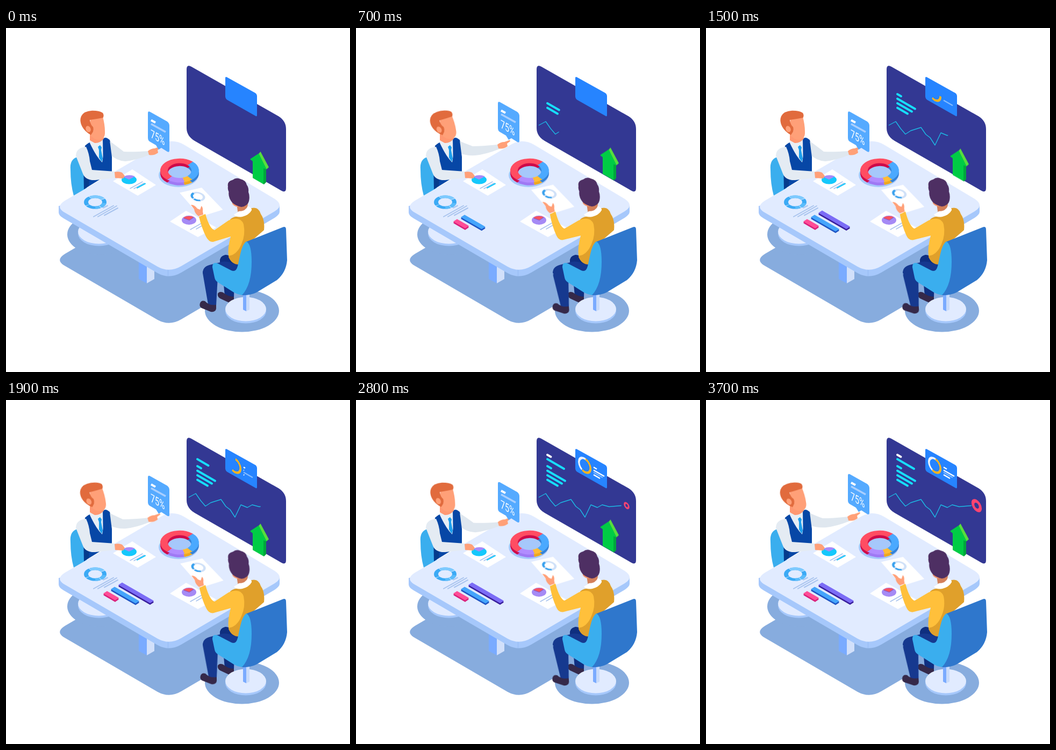
Animation of 640x640 px, one loop 3800 ms. Source, as an HTML page:

```html
<!DOCTYPE html>
<html lang="en">
<head>
<meta charset="utf-8">
<title>Business meeting</title>
<style>
html, body { margin: 0; width: 100%; height: 100%; overflow: hidden; background: #fff; }
svg { display: block; width: 100vw; height: 100vh; }
.line { fill: none; stroke-linecap: round; }

/* --t is the loop time in ms, --s an item's start, --d its duration */
.move, .grow, .pop {
  animation: var(--k) calc(var(--d) * 1ms) calc((var(--s, 0) - var(--t, 0)) * 1ms) paused both;
}
.grow { --k: grow; fill: none; stroke-dasharray: 1 2; animation-timing-function: ease-in-out; }
.bar { stroke-linecap: butt; stroke-width: 7; }
.pop { --k: pop; animation-timing-function: ease-out; }
.lift { --d: 1550; animation-iteration-count: infinite; animation-timing-function: ease; }
.sway {
  --d: 1075; animation-iteration-count: infinite; animation-direction: alternate;
  animation-timing-function: ease;
}
.card { --k: card; }
.nod { --k: nod; transform-origin: 165px 188px; }
.point { --k: point; }
.reach { --k: reach; }
.arrow { --k: arrow; --d: 1900; animation-iteration-count: infinite; animation-timing-function: ease-in-out; }
.look { --k: look; }
.hold { --k: hold; }
.arm { --k: arm; }
.leg { --k: leg; transform-origin: 378px 452px; animation-timing-function: cubic-bezier(.37, 0, .4, 1); }

@keyframes grow { from { stroke-dashoffset: 1.02; } to { stroke-dashoffset: 0; } }
@keyframes pop { from { transform: scale(0); } to { transform: scale(1); } }
@keyframes card {
  0%, 96%, 100% { transform: none; }
  45%, 62% { transform: translateY(-18px); }
}
@keyframes nod {
  0%, 96%, 100% { transform: rotate(0deg); }
  45%, 62% { transform: translate(1.5px, -.5px) rotate(-8deg); }
}
@keyframes point {
  0%, 96%, 100% { transform: none; }
  45%, 62% { transform: translate(-1px, -12px); }
}
@keyframes reach {
  0%, 96%, 100% { d: path("M190 209 Q196 212 219 230 Q236 231 265 229 L267 236 Q242 246 222 248 Q205 247 194 235 Z"); }
  45%, 62% { d: path("M190 209 Q196 212 217 220 Q234 220 263 217 L267 225 Q242 235 222 237 Q205 238 194 233 Z"); }
}
@keyframes arrow {
  0%, 92%, 100% { transform: none; }
  35%, 72% { transform: translateY(-7.5px); }
}
@keyframes look { to { transform: translate(1px, -1px); } }
@keyframes hold { to { transform: translate(3px, -6px); } }
@keyframes arm {
  from { d: path("M359 351 L371 346 Q379 374 388 376 L414 358 Q436 349 442 365 Q446 385 438 402 Q430 422 414 424 Q412 410 418 388 L385 398 Q377 398 372 388 Q364 372 359 351 Z"); }
  to { d: path("M361 346 L371 341 Q379 370 388 373 L414 358 Q436 349 442 365 Q446 385 438 402 Q430 422 414 424 Q412 410 418 386 L385 394 Q377 395 373 386 Q365 369 361 346 Z"); }
}
@keyframes leg { to { transform: translate(.5px, 4.5px) rotate(-5deg); } }
</style>
</head>
<body>
<svg viewBox="0 0 640 640">
<defs>
  <path id="slab" d="M107 342 Q92 332 110 321 L290 216 Q310 205 331 217 L500 318 Q518 330 500 341 L326 443 Q304 456 282 444 Z"/>
</defs>

<!-- wall screen -->
<path fill="#333893" d="M336 77 Q336 67 345 72 L505 163 Q521 172 521 188 V298 Q521 307 513 303 L351 210 Q336 201 336 186 Z"/>
<g class="line" stroke="#17dffb" stroke-width="4">
  <path class="grow" pathLength="1" style="--s:200;--d:450" d="M356 148.500 l19 11"/>
  <path class="grow" pathLength="1" style="--s:350;--d:500" d="M356 140 l27 15.500"/>
  <path class="grow" pathLength="1" style="--s:750;--d:450" d="M356 131.500 l33 19"/>
  <path class="grow" pathLength="1" style="--s:1050;--d:350" d="M356 123 l7 4"/>
  <path class="grow" pathLength="1" style="--s:1600;--d:500" d="M356 110 l31 18"/>
  <path class="grow" pathLength="1" style="--s:2200;--d:500" stroke="#fff" d="M356 102 l6.500 3.700"/>
</g>
<path class="grow" pathLength="1" style="--s:180;--d:2750;animation-timing-function:ease" stroke="#1cb9e4" stroke-width="1.400" stroke-linejoin="round"
  d="M340 181 L353 174 L362 187 L371 197.500 L381 191 L400 185 L409 198 L417 204 L426 218 L437 195 L449 200 L458 195 L471 198.500 L494 196.500"/>
<g transform="matrix(.866 .5 0 1 503.500 196.500)">
  <circle class="pop" style="--s:2550;--d:650" r="8" fill="#333893" stroke="#ff4470" stroke-width="6"/>
</g>

<path fill="#2684ff" d="M408 93 Q408 90 411 91.500 L464 121 Q467 123 467 126 V162 Q467 165.500 464 163.500 L412 134 Q408 131.500 408 127 Z"/>
<g transform="matrix(.866 .5 0 1 425.500 121.500)" stroke-width="4">
  <path class="grow" pathLength="1" style="--s:1050;--d:800" stroke="#ffb41f" d="M-5.240 11.240 A12.400 12.400 0 1 0 1.730 -12.280"/>
  <path class="grow" pathLength="1" style="--s:2050;--d:850" stroke="#eaf2ff" d="M1.730 -12.280 A12.400 12.400 0 0 0 -5.240 11.240"/>
</g>
<g stroke="#fff" stroke-width="2.200">
  <path class="grow" pathLength="1" style="--s:1650;--d:500" d="M442 125 l6 3.500"/>
  <path class="grow" pathLength="1" style="--s:1750;--d:900" d="M442 130.500 l20 11.500"/>
  <path class="grow" pathLength="1" style="--s:650;--d:800" stroke="#83bbff" d="M442 134.500 l17 9.800"/>
  <path class="grow" pathLength="1" style="--s:1700;--d:800" d="M442 139 l12 7"/>
</g>

<g class="move arrow">
  <path fill="#00a73c" d="M477 260 L484 262 V287 L480 291 L477 289 Z"/>
  <path fill="#57de3c" d="M470 234 L473.500 230 L489 259 L484.500 263 Z"/>
  <path fill="#00cc45" d="M454 244 L470 233.500 L485 263 L479 261 V290.500 L459 279 V248 Z"/>
</g>

<!-- floor -->
<g fill="#87acde">
  <use href="#slab" y="99"/>
  <ellipse cx="176" cy="384" rx="62" ry="38"/>
  <ellipse cx="439" cy="526" rx="69" ry="39.500"/>
</g>
<ellipse cx="173" cy="383" rx="39" ry="22.500" fill="#a6c8fb"/>
<ellipse cx="173" cy="379" rx="39" ry="22.500" fill="#e1ebff"/>
<path fill="#7aabff" d="M247 420 H262 V475 L247 467 Z"/>
<path fill="#d2e0fa" d="M262 420 H276 V467 L262 475 Z"/>

<!-- left man: chair and torso -->
<path fill="#3aaeee" d="M120 264 Q118 244 133 240 L150 238 V305 L126 312 Q120 290 120 264 Z"/>
<path fill="#0747a6" d="M147 219 Q160 207 186 204 Q193 206 195 214 L197 268 L145 300 V255 Z"/>
<path fill="#063b8c" d="M144 250 L156 262 L154 294 L145 300 Z"/>
<path fill="#e8eef5" d="M155 212 L163 206 L182 204 Q183 232 179 250 Q168 240 155 212 Z"/>
<path fill="#1c9fee" d="M171 221 L175 218 L178 222 L177 227 L180 243 L178 249 L173 241 L173 227 Z"/>

<!-- table -->
<path fill="#a6c8fb" d="M98 331 V343 Q98 349 107 354 L282 456 Q304 468 326 455 L500 353 Q509 347 509 342 V330 L304 300 Z"/>
<use href="#slab" fill="#e1ebff"/>
<path stroke="#95bbf4" d="M301.500 450 v11.500"/>

<g transform="translate(166 324) scale(1 .6)" fill="none" stroke-width="8">
  <circle r="17" stroke="#3baaf5"/>
  <circle r="17" stroke="#7dcaff" pathLength="100" stroke-dasharray="25 100" transform="rotate(-120)"/>
  <circle r="17" stroke="#5bbcfb" pathLength="100" stroke-dasharray="22 100" transform="rotate(10)"/>
  <circle r="17" stroke="#e1ebff" stroke-width="9" pathLength="100" stroke-dasharray="1 24" transform="rotate(-35)"/>
</g>
<path class="line" stroke="#a9c4ee" stroke-width="2" d="M163 351 L200 330.500 M181 334.500 L189 330.500 M171 351 L206 331 M183 348.500 L208 335"/>

<g transform="translate(323 266)" fill="none">
  <ellipse cx="-2" cy="8" rx="37" ry="22" fill="#a6c8fb"/>
  <g transform="translate(0 4.500) scale(1 .62)" stroke-width="14">
    <circle r="29" stroke="#3482d8" pathLength="100" stroke-dasharray="27 100" transform="rotate(-48)"/>
    <circle r="29" stroke="#efa820" pathLength="100" stroke-dasharray="7.200 100" transform="rotate(49)"/>
    <circle r="29" stroke="#9f79f4" pathLength="100" stroke-dasharray="15.300 100" transform="rotate(75)"/>
    <circle r="29" stroke="#cf0a4a" pathLength="100" stroke-dasharray="50.600 100" transform="rotate(130)"/>
  </g>
  <g transform="translate(0 -.800) scale(1 .62)" stroke-width="14">
    <circle r="29" stroke="#4ba9ff" pathLength="100" stroke-dasharray="27 100" transform="rotate(-48)"/>
    <circle r="29" stroke="#ffbb38" pathLength="100" stroke-dasharray="7.200 100" transform="rotate(49)"/>
    <circle r="29" stroke="#b18cff" pathLength="100" stroke-dasharray="15.300 100" transform="rotate(75)"/>
    <circle r="29" stroke="#ff4d62" pathLength="100" stroke-dasharray="50.600 100" transform="rotate(130)"/>
  </g>
</g>

<!-- bars: two dark layers below a bright top -->
<g class="bars"></g>

<!-- papers -->
<path fill="#fff" d="M199 285 L235 263 L279 292 L245 312 Z"/>
<ellipse cx="229" cy="282.500" rx="14" ry="8" fill="#14c8fc"/>
<path fill="#a78bfa" d="M218 277 Q228 271 240 276 L229 282 Z"/>
<path class="line" stroke="#a9c4ee" stroke-width="1.500" d="M231 298.500 L254 286 M238 299 L257 288.500"/>
<path class="line" stroke="#14c8fc" stroke-width="2" d="M244 297.500 L259 289.500"/>

<path fill="#fff" d="M305 360 L335 340 L391 371 L357 389 Z"/>
<ellipse cx="340.500" cy="357.500" rx="13.500" ry="8.500" fill="#a58af5"/>
<path fill="#f7525f" d="M330 353 Q337 348 349 351.500 L341 357 Z"/>
<path fill="none" stroke="#8a3a86" stroke-width=".8" d="M331 354 L341 357.500 L349 352.500"/>
<path class="line" stroke="#a9c4ee" stroke-width="1.500" d="M343 375 L366 362 M354 374 L366 367"/>

<g class="move sway hold">
  <path fill="#fff" d="M323 306.500 L364 297 L403.500 338 L362 351 Z"/>
  <g transform="translate(357 313.500) rotate(12) scale(1 .62)" fill="none" stroke-width="4.500">
    <circle r="11.500" stroke="#cfe0f8"/>
    <circle r="11.500" stroke="#3aa2ee" pathLength="100" stroke-dasharray="23 100" transform="rotate(135)"/>
    <circle r="11.500" stroke="#3aa2ee" pathLength="100" stroke-dasharray="17 100" transform="rotate(60)"/>
  </g>
</g>

<!-- left man: arms and head -->
<path class="move lift reach" fill="#dfe7ef" d="M190 209 Q196 212 219 230 Q236 231 265 229 L267 236 Q242 246 222 248 Q205 247 194 235 Z"/>
<path fill="#0747a6" d="M180 206 Q190 204 193 209 L197 240 V265 L181 266 Z"/>
<path fill="#e4ebf3" d="M130 238 Q130 223 149 221 Q155 234 156 248 L160 264 L203 267 V279 L166 283 Q148 284 143 271 Z"/>
<path fill="#ffa078" d="M202 268 Q210 266 216 269 L221 275 L218 280 L203 279 Z"/>
<path fill="#ff9872" d="M156 190 L180 196 L182 206 Q174 215 165 214 L156 209 Z"/>
<g class="move lift nod">
  <path fill="#ffa078" d="M157 168 L180 165 Q184 180 184 192 Q185 207 173 208 Q163 208 156 198 Z"/>
  <path fill="#e16b3d" d="M158 199 Q147 193 142 184 Q136 173 140 164 Q145 154.500 160 153.800 Q173 153.500 180 158 Q183 162 180.500 167 Q170 169 156 171 Q157 180 162 184 Q164 191 160 196 Z"/>
  <ellipse cx="153" cy="188" rx="4.500" ry="6" fill="#ffa078" transform="rotate(-20 153 188)"/>
</g>
<g class="move lift point">
  <path fill="#ffa078" d="M264 229 Q270 224 277 224 L287 220.500 L288 222.500 L282 227 L283 232 Q275 238 266 236 Z"/>
</g>
<g class="move lift card">
  <path fill="#55aaff" d="M264 158 Q264 154 268 156 L300 174 Q304 177 304 182 V228 Q304 232 300 230 L289 223 L284 226 L279 218 L267 211 Q264 209 264 204 Z"/>
  <path stroke="#fff" stroke-width="4" d="M270 171.500 l8 4.600"/>
  <path stroke="#a9cfff" stroke-width="3.600" d="M270 178.500 l27 15"/>
  <text transform="matrix(.66 .38 0 1 269 203.500)" font-family="Roboto, sans-serif" font-size="21.500" fill="#fff">75%</text>
</g>

<!-- right man and chair -->
<path fill="#0f2f80" d="M403 455 L425 462 L424 501 Q415 504 407 499 Z"/>
<path fill="#35294a" d="M394 494 Q397 489 404 492 Q411 499 424 500 V506 Q422 513 415 511 L398 503 Q393 500 394 494 Z"/>
<g class="move sway leg">
  <path fill="#16398f" d="M366 456 Q367 442 382 441 L394 462 L391 516 Q384 520 376 514 Z"/>
  <path fill="#35294a" d="M361 512 Q363 506 370 508 Q378 517 391 515 V522 Q390 529 381 528 L364 521 Q359 518 361 512 Z"/>
</g>
<path fill="#16398f" d="M366 456 Q366 443 382 440 L398 436 Q397 424 409 422 L440 436 L432 460 L395 462 L380 460 Z"/>
<path fill="#0f2f80" d="M398 436 Q397 424 409 422 L420 424 L434 440 L424 439 Q410 432 398 436 Z"/>

<path fill="#e0a02b" d="M417 356 Q424 349 440 350 L457 335 Q470 332 474 346 Q482 357 480 376 L450 402 L433 440 Q420 440 414 426 L420 390 Z"/>
<path class="move sway arm" fill="#ffc03b" d="M359 351 L371 346 Q379 374 388 376 L414 358 Q436 349 442 365 Q446 385 438 402 Q430 422 414 424 Q412 410 418 388 L385 398 Q377 398 372 388 Q364 372 359 351 Z"/>
<path class="move sway hold" fill="#ffa078" d="M344 329 Q350 328 356 336 L361 338 L363.500 331 Q367 334 366 341 L367 347 L358 350 Q351 345 350 337 Z"/>
<path fill="#d4805a" d="M429 326 L450 326 L449 338 L432 348 Z"/>
<path fill="#fff" d="M424 347 Q430 344 433 341 Q446 341 450 331 Q458 335 457 339 Q452 348 440 351 Q428 353 424 347 Z"/>
<g class="move sway look">
  <path fill="#f3946c" d="M421 320 L430 322 L432 333 Q424 332 421 327 Z"/>
  <path fill="#4e2f63" d="M413 295 Q411 285 422 282.500 Q428 277.500 436 281 Q446 283 448 292 Q452 297 451 305 Q454 313 452 322 Q450 331 438 333 Q428 331 421 325 Q413 315 414.500 305 Q412 300 413 295 Z"/>
</g>

<ellipse cx="446" cy="527" rx="38" ry="22.500" fill="#a6c8fb"/>
<ellipse cx="446" cy="523" rx="38" ry="22.500" fill="#e1ebff"/>
<path fill="#7aabff" d="M441 490 H447 V527 L441 524 Z"/>
<path fill="#c9dbfa" d="M447 490 H453 V524 L447 527 Z"/>
<path fill="#2f77cc" d="M446 398 L514 371 Q521 368 521 375 L523 432 Q521 455 504 469 L466 492 Q454 498 438 497 Z"/>
<path fill="#3aaeee" d="M447 397 Q457 402 457 435 Q457 478 439 497 Q431 496 424 492 L394 473 Q389 470 388 464 L384 445 Q384 434 394 438 L419 451 Q428 455 431 443 L436 420 Q440 402 447 397 Z"/>
</svg>
<script>
const LOOP = 3800, STEP = 100;

// start, length, side colour, top colour, growth start and duration
const bars = [
  [209, 344, 59, "#3a1f9c", "#7b6cf6", 850, 850],
  [195, 352, 46, "#1f55c4", "#45a5fb", 300, 550],
  [181, 360, 22, "#d9207c", "#ff4d96", 100, 400]
];
document.querySelector(".bars").innerHTML = bars.map(([x, y, len, side, top, s, d]) =>
  [3, 1.5, 0].map(drop =>
    `<path class="grow bar" pathLength="1" style="--s:${s};--d:${d}" stroke="${drop ? side : top}"
      transform="matrix(1 .575 1 -.65 ${x} ${y + drop})" d="M0 3.500 h${len}"/>`
  ).join("")
).join("");

const begin = performance.now();
function tick() {
  const t = (performance.now() - begin) % LOOP;
  document.documentElement.style.setProperty("--t", Math.floor(t / STEP) * STEP);
  requestAnimationFrame(tick);
}
tick();
</script>
</body>
</html>
```
